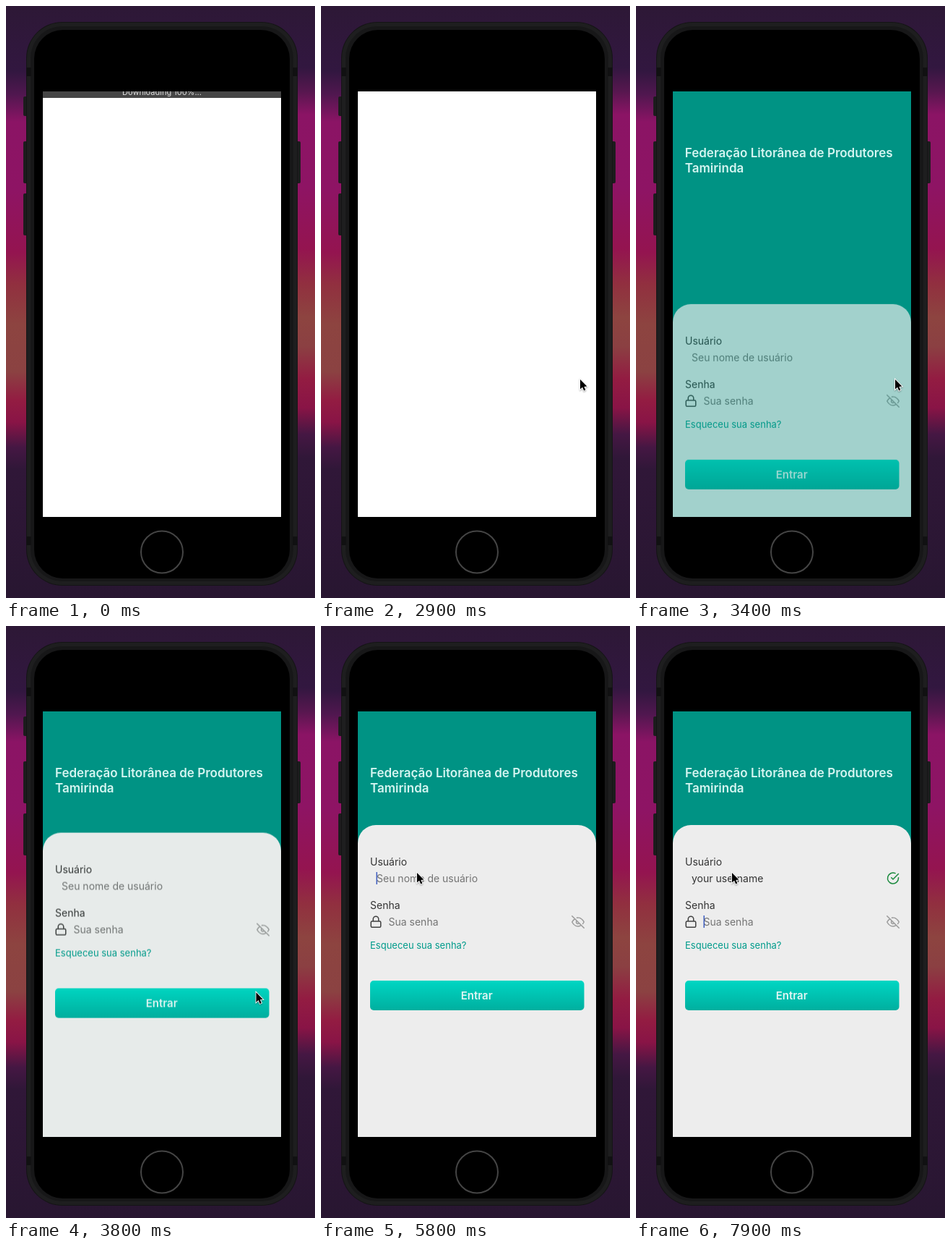
An HTML page with a canvas for the animation above (8 s loop, 428 px wide and 818 px high).

```html
<!DOCTYPE html>
<html lang="pt-BR">
<head>
<meta charset="utf-8">
<title>Login</title>
<style>
  html, body { margin: 0; width: 100%; height: 100%; overflow: hidden; background: #2d1836; }
  canvas { display: block; width: 428px; height: 818px; }
</style>
</head>
<body>
<canvas id="stage"></canvas>
<script>
const W = 428, H = 818, LOOP = 8000, STEP = 100;
const SCREEN = { x: 51, y: 118, w: 330, h: 588 };
const PANEL_Y = 275, PANEL_H = 431;
const TEAL = '#009384';
const FONT = 'Inter, Roboto, sans-serif';

const T = {
  barGone: 2500, appIn: 3000, panelMs: 1000, titleMs: 430,
  focusUser: 4500, typeFrom: 6000, keyMs: 150, focusPass: 7800
};

const dpr = window.devicePixelRatio || 1;
function setup(canvas) {
  canvas.width = Math.round(W * dpr);
  canvas.height = Math.round(H * dpr);
  const c = canvas.getContext('2d');
  c.scale(dpr, dpr);
  return c;
}
const ctx = setup(document.getElementById('stage'));
const backdrop = document.createElement('canvas');
const layer = document.createElement('canvas');
const bg = setup(backdrop), form = setup(layer);

const clamp = v => Math.max(0, Math.min(1, v));
const span = (t, a, b) => clamp((t - a) / (b - a));
const mix = (a, b, k) => a + (b - a) * k;
const smooth = k => k * k * (3 - 2 * k);

// cubic-bezier(.25, .1, .25, 1)
function ease(x) {
  if (x <= 0 || x >= 1) return clamp(x);
  const curve = (u, a, b) => 3 * (1 - u) * (1 - u) * u * a + 3 * (1 - u) * u * u * b + u * u * u;
  let lo = 0, hi = 1;
  for (let i = 0; i < 24; i++) {
    const mid = (lo + hi) / 2;
    if (curve(mid, .25, .25) < x) lo = mid; else hi = mid;
  }
  return curve(lo, .1, 1);
}

function box(c, x, y, w, h, r, fill) {
  c.beginPath();
  c.roundRect(x, y, w, h, r);
  c.fillStyle = fill;
  c.fill();
}

function text(c, str, x, y, size, color, weight = 400, align = 'left') {
  c.font = `${weight} ${size}px ${FONT}`;
  c.textAlign = align;
  c.fillStyle = color;
  c.fillText(str, x, y);
}

function gradient(c, y0, y1, stops) {
  const g = c.createLinearGradient(0, y0, 0, y1);
  stops.forEach(([y, color]) => g.addColorStop((y - y0) / (y1 - y0), color));
  return g;
}

// 24-unit outline icon drawn at 18px
function icon(c, path, x, y, color) {
  c.save();
  c.translate(x, y);
  c.scale(.75, .75);
  c.strokeStyle = color;
  c.lineWidth = 2;
  c.lineCap = c.lineJoin = 'round';
  c.stroke(new Path2D(path));
  c.restore();
}
const LOCK = 'M5 11H19a2 2 0 0 1 2 2v7a2 2 0 0 1-2 2H5a2 2 0 0 1-2-2v-7a2 2 0 0 1 2-2zM7 11V7a5 5 0 0 1 10 0v4';
const EYE_OFF = 'M17.9 17.9A10 10 0 0 1 12 20C5 20 1 12 1 12a18.5 18.5 0 0 1 5.1-5.9' +
  'M9.9 4.2A9 9 0 0 1 12 4c7 0 11 8 11 8a18.5 18.5 0 0 1-2.2 3.2M14.1 14.1a3 3 0 1 1-4.2-4.2M1 1L23 23';
const CHECK = 'M22 11.1V12a10 10 0 1 1-5.9-9.1M22 4L12 14 9 11';

function paintBackdrop() {
  const c = bg;
  c.fillStyle = gradient(c, 0, H, [
    [0, '#2d1836'], [90, '#321740'], [122, '#50174f'], [160, '#8b1465'], [255, '#8e1464'],
    [340, '#941450'], [385, '#91303f'], [440, '#8d4440'], [505, '#8b4242'], [545, '#931c42'],
    [575, '#891446'], [610, '#451743'], [640, '#301738'], [H, '#281631']
  ]);
  c.fillRect(0, 0, W / 2, H);
  c.fillStyle = gradient(c, 0, H, [
    [0, '#2d1836'], [85, '#321740'], [118, '#57174f'], [150, '#8b1465'], [250, '#8e1464'],
    [335, '#941450'], [385, '#91303f'], [430, '#8d4440'], [470, '#8b4042'], [515, '#931c42'],
    [555, '#891446'], [592, '#451743'], [625, '#301738'], [H, '#281631']
  ]);
  c.fillRect(W / 2, 0, W / 2, H);

  [[125, 27], [187, 58], [259, 58]].forEach(([y, h]) => box(c, 24, y, 8, h, 2, '#1c1c1d'));
  box(c, 400, 187, 8, 58, 2, '#1c1c1d');
  box(c, 28, 22, 376, 779, 50, '#141415');
  box(c, 29, 23, 374, 777, 49, '#1e1e1f');
  box(c, 34, 28, 364, 767, 44, '#171718');
  c.fillStyle = '#111112';
  [85, 733].forEach(y => { c.fillRect(28, y, 7, 12); c.fillRect(397, y, 7, 12); });
  box(c, 39, 33, 354, 758, 40, '#000');

  c.beginPath();
  c.arc(216, 754.5, 29, 0, Math.PI * 2);
  c.strokeStyle = '#454545';
  c.lineWidth = 2;
  c.stroke();
}

function caret(c, x, y, since) {
  if (since % 1000 >= 500) return;
  c.fillStyle = '#405fc0';
  c.fillRect(x, y, 1.5, 17);
}

function paintForm(t) {
  const c = form;
  c.clearRect(0, 0, W, H);
  box(c, SCREEN.x, PANEL_Y, SCREEN.w, PANEL_H, [25, 25, 0, 0], '#ededed');

  text(c, 'Usuário', 68, 330.5, 14, '#343434');
  const word = 'yourusername';
  const count = t < T.typeFrom ? 0 : Math.min(word.length, Math.floor((t - T.typeFrom) / T.keyMs) + 1);
  const inPass = t >= T.focusPass;
  const user = inPass ? 'your username' : word.slice(0, count);
  text(c, user || 'Seu nome de usuário', 77, 353.5, 14, user ? '#343434' : '#747474');
  if (count >= 4) icon(c, CHECK, 347, 339.5, '#1b8a3e');
  if (t >= T.focusUser && !inPass) {
    c.font = `400 14px ${FONT}`;
    caret(c, 76.5 + c.measureText(user).width, 340, count ? 0 : t - T.focusUser);
  }

  text(c, 'Senha', 68, 391, 14, '#343434');
  icon(c, LOCK, 67, 399.8, '#404040');
  text(c, 'Sua senha', 93.5, 414, 14, '#747474');
  if (inPass) caret(c, 93.5, 400, t - T.focusPass);
  icon(c, EYE_OFF, 347, 400, '#9a9a9a');
  text(c, 'Esqueceu sua senha?', 68, 446, 13, '#009b8b');

  box(c, 68, 490, 296.5, 41, 5, gradient(c, 490, 531, [[490, '#00d6c3'], [531, '#00af9f']]));
  text(c, 'Entrar', 215.7, 516, 15, '#e3f6f4', 600, 'center');
}

function paintApp(t) {
  const age = t - T.appIn;
  ctx.fillStyle = TEAL;
  ctx.fillRect(SCREEN.x, SCREEN.y, SCREEN.w, SCREEN.h);

  const k = ease(clamp(age / T.titleMs));
  ctx.globalAlpha = k;
  const x = 68 - 100 * (1 - k);
  text(ctx, 'Federação Litorânea de Produtores', x, 209, 17, '#d5f5f1', 600);
  text(ctx, 'Tamirinda', x, 230, 17, '#d5f5f1', 600);

  const p = ease(clamp(age / T.panelMs));
  paintForm(t);
  ctx.globalAlpha = p;
  ctx.drawImage(layer, 0, PANEL_H * (1 - p), W, H);
  ctx.globalAlpha = 1;
}

function paintBlank(t) {
  ctx.fillStyle = '#fff';
  ctx.fillRect(SCREEN.x, SCREEN.y, SCREEN.w, SCREEN.h);
  if (t >= T.barGone) return;
  ctx.fillStyle = '#464646';
  ctx.fillRect(SCREEN.x, SCREEN.y, SCREEN.w, 9);
  text(ctx, 'Downloading 100%...', 216, 122.5, 11, '#dedede', 400, 'center');
}

function paintPointer(t) {
  const enter = smooth(span(t, 1100, 1700));
  const move = smooth(span(t, 3700, 4400));
  if (!enter) return;
  ctx.save();
  ctx.translate(mix(mix(432, 359, enter), 133, move), mix(mix(590, 516, enter), 341, move));
  ctx.beginPath();
  [[0, 0], [0, 13.6], [3.1, 10.8], [5.2, 15.6], [7.4, 14.6], [5.4, 9.9], [9.4, 9.6]]
    .forEach(([x, y]) => ctx.lineTo(x, y));
  ctx.closePath();
  ctx.shadowColor = 'rgba(0,0,0,.35)';
  ctx.shadowBlur = 2 * dpr;
  ctx.shadowOffsetY = dpr;
  ctx.strokeStyle = '#fff';
  ctx.lineWidth = 1.8;
  ctx.stroke();
  ctx.shadowColor = 'transparent';
  ctx.fillStyle = '#000';
  ctx.fill();
  ctx.restore();
}

function draw() {
  const t = Math.floor((performance.now() % LOOP) / STEP) * STEP;
  ctx.drawImage(backdrop, 0, 0, W, H);
  ctx.save();
  ctx.beginPath();
  ctx.rect(SCREEN.x, SCREEN.y, SCREEN.w, SCREEN.h);
  ctx.clip();
  if (t < T.appIn) paintBlank(t); else paintApp(t);
  ctx.restore();
  paintPointer(t);
  requestAnimationFrame(draw);
}

paintBackdrop();
draw();
</script>
</body>
</html>
```
